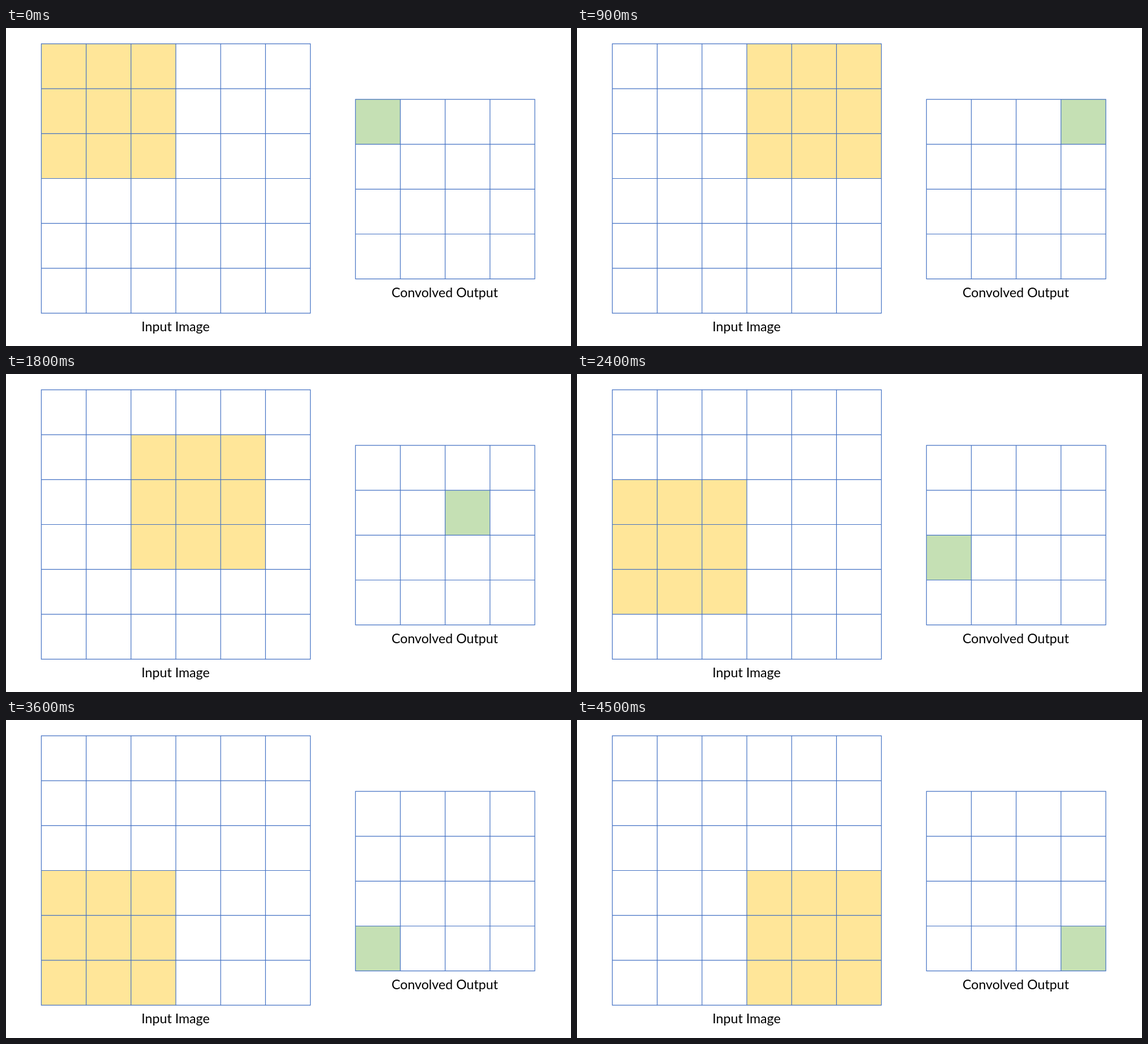
An HTML page for the animation above (4800 ms loop, 998 by 561 pixels).

```html
<!DOCTYPE html>
<html lang="en">
<head>
<meta charset="utf-8">
<title>Convolution</title>
<style>
  html, body { margin: 0; width: 100%; height: 100%; overflow: hidden; background: #fff; }
  svg { display: block; width: 998px; height: 561px; }
  path { fill: none; stroke: #4472c4; stroke-width: 1.2; stroke-linecap: square; }
  text { font: 23.2px Lato, Carlito, sans-serif; text-anchor: middle; fill: #000; }
</style>
</head>
<body>
<svg viewBox="0 0 998 561">
  <g id="input" transform="translate(62.4 27.9)"><rect fill="#ffe699"/><path/></g>
  <g id="output" transform="translate(617.3 125.9)"><rect fill="#c5e0b4"/><path/></g>
  <text x="299.5" y="535">Input Image</text>
  <text x="775" y="475.4">Convolved Output</text>
</svg>
<script>
const CELL = 79.2, STEP_MS = 300, OUTPUT_CELLS = 4;

// Draws a square grid and returns a function that moves its highlight.
function setupGrid(id, cells, highlightCells) {
  const group = document.getElementById(id);
  const rect = group.querySelector('rect');
  const size = cells * CELL;
  let lines = '';
  for (let i = 0; i <= cells; i++) {
    const p = i * CELL;
    lines += `M0 ${p}H${size}M${p} 0V${size}`;
  }
  group.querySelector('path').setAttribute('d', lines);
  rect.setAttribute('width', highlightCells * CELL);
  rect.setAttribute('height', highlightCells * CELL);
  return (column, row) => {
    rect.setAttribute('x', column * CELL);
    rect.setAttribute('y', row * CELL);
  };
}

const moveKernel = setupGrid('input', 6, 3);
const moveResult = setupGrid('output', OUTPUT_CELLS, 1);
const start = performance.now();

function draw() {
  const elapsed = performance.now() - start;
  const step = Math.floor(elapsed / STEP_MS) % OUTPUT_CELLS ** 2;
  const column = step % OUTPUT_CELLS;
  const row = Math.floor(step / OUTPUT_CELLS);
  moveKernel(column, row);
  moveResult(column, row);
  requestAnimationFrame(draw);
}
draw();
</script>
</body>
</html>
```
